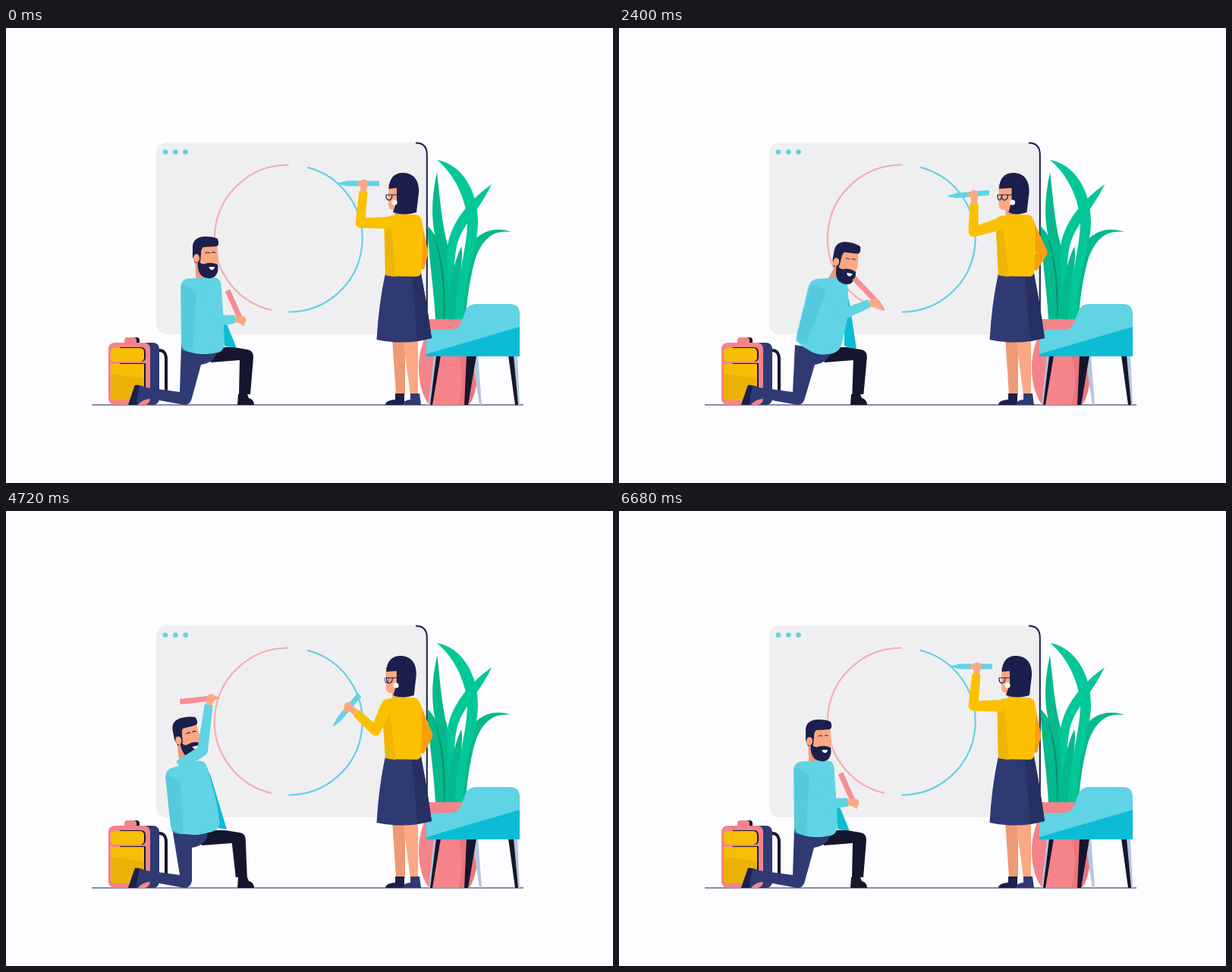
An HTML page for the animation above (6.72 s loop, 800 by 600 pixels).

```html
<!DOCTYPE html>
<html lang="en">
<head>
<meta charset="utf-8">
<title>Drawing together</title>
<style>
  html, body { margin: 0; width: 100%; height: 100%; overflow: hidden; background: #fdfcff; }
  svg { display: block; width: 800px; height: 600px; }
  .navy { fill: #2f3a73; } .ink { fill: #1b1f4b; } .black { fill: #15162e; }
  .sky { fill: #60d3e4; } .teal { fill: #0cbcd5; } .pink { fill: #f5838a; }
  .skin { fill: #fba883; } .tan { fill: #ee9a76; } .sun { fill: #fbc100; }
  .leaf { fill: #02c798; } .fern { fill: #04b98c; } .moss { fill: #07906f; } .steel { fill: #b3c6dd; }
  .line { fill: none; stroke: #1b1f4b; }
</style>
</head>
<body>
<svg viewBox="0 0 800 600">
  <rect width="800" height="600" fill="#fdfcff"/>

  <!-- board -->
  <rect x="198" y="151" width="357" height="253" rx="14" fill="#efeff2"/>
  <path class="line" stroke-width="2" d="M540 151.5Q554.8 151.5 554.8 167V392"/>
  <g class="sky"><circle cx="210" cy="163.5" r="3.3"/><circle cx="223.4" cy="163.5" r="3.3"/><circle cx="236.6" cy="163.5" r="3.3"/></g>
  <g fill="none" stroke-width="2.2">
    <path stroke="#f7adae" d="M372.5 180.5A97 97 0 0 0 350 372"/>
    <path stroke="#60d3e4" d="M397 183.6A97 97 0 0 1 372.5 374.5"/>
  </g>
  <path class="line" d="M113 497H682"/>

  <!-- plant -->
  <path id="leafLeft" class="fern"/>
  <path class="moss" d="M566 281Q581 284 587 297L593 384H577Q577 320 566 281Z"/>
  <path id="leafSmall" class="fern"/>
  <path id="leafSpike" class="fern"/>
  <path id="leafCross" class="leaf"/>
  <path class="fern" d="M600 288Q603 300 597 335L594 384H581Q582 350 588 328Q592 305 600 288Z"/>
  <path id="leafTop" class="leaf"/>
  <path class="pink" d="M557 384H606V400C614 412 622 428 622 446C622 472 616 490 610 497H558C550 488 544 470 544 448C544 428 550 410 557 400Z"/>
  <path fill="#ee747d" d="M597 433H622C622 470 616 490 610 497H596Q605 470 597 433Z"/>

  <!-- chair -->
  <path class="steel" d="M564 432H570L560 497H557ZM614 432H622L627 497H624ZM668 432H674L677 497H674Z"/>
  <path class="black" d="M567 432H573L562 497H559ZM607 432H620L609 497H604ZM662 432H669L675 497H671Z"/>
  <path class="sky" d="M554 433V410Q554 398 566 398H585Q596 398 600 388L605 374Q609 364 619 364H664Q677 364 677 377V433Z"/>
  <path class="teal" d="M554 430L677 394V433H554Z"/>

  <!-- suitcase -->
  <path class="line" stroke-width="4" style="stroke:#15162e" d="M200 425Q211 424 211 437V478Q211 489 200 489"/>
  <path class="black" d="M160 416V411Q160 408 164 408H172Q176 408 176 412V416Z"/>
  <path class="pink" d="M156 416V412Q156 408 160 408H168Q172 408 172 412V416Z"/>
  <rect class="navy" x="160" y="415" width="42" height="82" rx="8"/>
  <rect class="pink" x="135" y="415" width="55" height="82" rx="8"/>
  <path class="black" d="M150 421H178Q184 421 184 428V434Q184 440 178 440H150ZM150 442H184V485Q184 491 178 491H150Z"/>
  <rect x="138" y="422" width="44" height="18" rx="5" fill="#f6be05"/>
  <path fill="#f6be05" d="M138 443H182V485Q182 491 176 491H144Q138 491 138 485Z"/>
  <path fill="#eab207" d="M138 456L182 462V485Q182 491 176 491H144Q138 491 138 485Z"/>

  <!-- kneeling figure -->
  <path id="manBackArm" class="teal"/>
  <path id="manFrontLeg" class="black"/>
  <path class="black" d="M306 483H318L320 488Q327 490 327 497H305Z"/>
  <path id="manKneel" class="navy"/>
  <path class="ink" d="M170 471Q174 470 176 473L173 485L172 497H161Z"/>
  <path id="manNeck" fill="none" stroke="#f0997a" stroke-width="13"/>
  <path id="manTorso" class="sky"/>
  <path id="manShade" fill="#4cc6d9" opacity=".6"/>
  <g id="manHead">
    <path class="skin" d="M253 285H278L280 304Q280 316 270 318H253Z"/>
    <path class="ink" d="M246 302V288Q247 275 263 275Q274 275 279 278Q282 287 277 288L260 289Q257 291 257 298L256 308L249 310Z"/>
    <path class="ink" d="M253 305Q257 313 262 311Q270 308 279 312Q281 322 275 328Q267 333 258 327Q251 320 253 305Z"/>
    <ellipse class="skin" cx="251" cy="303.500" rx="4" ry="5.500"/>
    <path fill="#fff" d="M267.500 315H275Q274.500 319 271 319Q268 318.500 267.500 315Z"/>
    <path class="line" stroke-width="1" d="M262.500 297q3 -2 6 0M271 296.500q2.500 -2 5 0"/>
  </g>
  <path id="manArm" class="sky"/>
  <path id="manPencil" fill="#f78e92"/>
  <path id="manHand" class="skin"/>

  <!-- standing figure -->
  <path class="tan" d="M509 408H526V484H514Z"/>
  <path class="skin" d="M523 408H543V484H533Z"/>
  <path class="ink" d="M513 482H525V497H500Q500 491 513 490Z"/>
  <path class="navy" d="M533 482H545L547 497H523Q523 491 533 490Z"/>
  <path id="womanBackArm" fill="#f99f0d"/>
  <path class="navy" d="M500 323H547Q555 365 561 409Q526 419 488.500 411Q491 365 500 323Z"/>
  <path fill="#273063" d="M535 325H547Q555 365 561 409L542 413Z"/>
  <path id="womanNeck" class="tan"/>
  <path id="womanTorso" class="sun"/>
  <path id="womanShade" fill="#efb505"/>
  <g id="womanHead">
    <path class="skin" d="M504 206V234Q505 240 511 240H526V206Z"/>
    <path id="hair" class="ink"/>
    <path id="lens" class="line" stroke-width="1.200"/>
    <path id="farLens" class="line" stroke-width="1.200"/>
    <circle id="earring" cy="230" r="3.600" fill="#fff"/>
  </g>
  <path id="womanArm" class="sun"/>
  <path id="womanPencil" class="sky"/>
  <path id="womanHand" class="skin"/>
</svg>
<script>
const LOOP = 6720;
const parts = {};
document.querySelectorAll('[id]').forEach(el => parts[el.id] = el);
const draw = (id, d) => parts[id].setAttribute('d', d);

// Arm: shoulder, elbow, wrist, grip. Pencil: tip, end.
const rest = {
  head: [262, 303, 0], hip: [0], neck: [257, 334],
  torso: [230, 331, 283, 328, 287, 390, 288, 427, 258, 431, 231, 425],
  back: [284, 375, 290, 388, 304, 422, 288, 420],
  arm: [268, 345, 278, 386, 302, 384, 311, 385], pencil: [313, 393, 292, 346]
};
const lean = {
  head: [293, 308, 5], hip: [1], neck: [280, 336],
  torso: [252, 331, 301, 329, 303, 375, 291, 428, 262, 432, 232, 414],
  back: [297, 352, 303, 358, 313, 423, 297, 420],
  arm: [285, 345, 292, 379, 332, 363, 341, 363], pencil: [350, 372, 315, 330]
};
const leanLow = { ...lean, head: [297, 310, 10], pencil: [350, 372, 310, 330], arm: [285, 345, 292, 379, 330, 363, 338, 362] };
const lift = {
  head: [256, 301, 0], hip: [-6], neck: [251, 333],
  torso: [225, 333, 276, 327, 278, 380, 283, 423, 250, 430, 224, 420],
  back: [277, 340, 283, 368, 299, 419, 283, 422],
  arm: [268, 337, 282, 337, 287, 286, 290, 278], pencil: [299, 277, 249, 284]
};
const reach = {
  head: [238, 300, -11], hip: [-12], neck: [235, 334],
  torso: [209, 341, 262, 327, 277, 380, 283, 420, 252, 428, 218, 424],
  back: [262, 333, 270, 350, 291, 420, 274, 417],
  arm: [228, 336, 259, 316, 267, 258, 270, 249], pencil: [281, 248, 229, 253]
};
const reachHigh = { ...reach, arm: [228, 336, 259, 316, 268, 254, 271, 246], pencil: [281, 245, 230, 251] };

const manKeys = [[0, rest], [900, lean], [1000, lean], [2400, leanLow], [3280, lift],
  [3920, reach], [5600, reachHigh], [6560, rest], [LOOP, rest]];

const pose = (dx, turn, top, elbow, arm, pencil) => ({ head: [dx, turn], top: [top], elbow: [elbow], arm, pencil });
const up = pose(0, 0, 0, 549, [505, 257, 467, 257, 471, 215, 472, 205], [437, 205, 492, 205]);
const womanKeys = [[0, up],
  [1000, pose(0, 0, 0, 559, [505, 257, 467, 246, 467, 205, 467, 194], [432, 201, 487, 190])],
  [2400, pose(-3.5, 1, -2, 557, [503, 258, 467, 269, 468, 231, 468, 219], [433, 222, 488, 217])],
  [3280, pose(-9, 1, -7, 554, [498, 257, 481, 290, 462, 259, 455, 248], [428, 267, 473, 237])],
  [3920, pose(-7.5, 1, -5, 554, [500, 257, 483, 290, 461, 261, 453, 250], [429, 272, 472, 238])],
  [5600, pose(0, 0, -1, 556, [503, 258, 490, 290, 462, 270, 450, 264], [434, 293, 460, 246])],
  [6560, up], [LOOP, up]];

// Monotone cubic through the keys: holds stay still, passing poses keep their speed.
function sample(keys, t) {
  let i = 0;
  while (i < keys.length - 2 && t >= keys[i + 1][0]) i++;
  const span = keys[i + 1][0] - keys[i][0], u = (t - keys[i][0]) / span;
  const result = {};
  for (const name in keys[0][1]) {
    result[name] = keys[i][1][name].map((a, n) => {
      const b = keys[i + 1][1][name][n];
      const rate = k => (keys[k + 1][1][name][n] - keys[k][1][name][n]) / (keys[k + 1][0] - keys[k][0]);
      const slope = k => {
        if (k === 0 || k === keys.length - 1) return 0;
        const p = rate(k - 1), q = rate(k);
        return p * q > 0 ? 2 * p * q / (p + q) : 0;
      };
      const v = 1 - u;
      return v * v * ((1 + 2 * u) * a + u * span * slope(i)) + u * u * ((1 + 2 * v) * b - v * span * slope(i + 1));
    });
  }
  return result;
}

const pairs = list => list.reduce((out, v, i) => (i % 2 ? out[out.length - 1].push(v) : out.push([v]), out), []);
const toward = (a, b, r) => {
  const len = Math.hypot(b[0] - a[0], b[1] - a[1]) || 1, k = Math.min(r / len, 0.5);
  return [a[0] + (b[0] - a[0]) * k, a[1] + (b[1] - a[1]) * k];
};

// Polygon with rounded corners.
function soft(list, r) {
  const pts = pairs(list), n = pts.length;
  return pts.map((p, i) => {
    const from = toward(p, pts[(i + n - 1) % n], r), to = toward(p, pts[(i + 1) % n], r);
    return `${i ? 'L' : 'M'}${from}Q${p} ${to}`;
  }).join('') + 'Z';
}

const disc = ([x, y], r) => `M${x + r} ${y}A${r} ${r} 0 1 0 ${x - r} ${y}A${r} ${r} 0 1 0 ${x + r} ${y}Z`;

function bar(a, b, ra, rb) {
  const len = Math.hypot(b[0] - a[0], b[1] - a[1]) || 1;
  const nx = (a[1] - b[1]) / len, ny = (b[0] - a[0]) / len;
  const at = (p, r) => [p[0] + nx * r, p[1] + ny * r];
  return `M${at(a, ra)}L${at(b, rb)}L${at(b, -rb)}L${at(a, -ra)}Z`;
}

const limb = (a, b, c, ra, rb, rc) => bar(a, b, ra, rb) + disc(b, rb) + bar(b, c, rb, rc);

function pencil([tx, ty, ex, ey], r) {
  const neck = toward([tx, ty], [ex, ey], 12);
  return bar([tx, ty], neck, 0.4, r) + bar(neck, [ex, ey], r, r);
}

// Palm with a finger and thumb closing on the pencil.
function hand(wrist, grip, tip) {
  const finger = toward(grip, tip, 7);
  return bar(wrist, grip, 4, 5) + disc(grip, 5.5) + bar(grip, finger, 4.5, 2.5) + disc(finger, 2.5);
}

function drawPlant(t) {
  const s = (1 - Math.cos(t / LOOP * 6 * Math.PI)) / 2;
  draw('leafLeft', `M${555 - s} 260C564 270 578 288 583 320L584 384H566C564 345 558 310 ${555 - s} 260Z`);
  draw('leafSmall', `M${666 - 2 * s} ${269 - s}C644 266 628 276 618 306C611 332 607 360 606 384H594C597 345 601 318 608 295C616 273 640 259 ${666 - 2 * s} ${269 - s}Z`);
  draw('leafSpike', `M${568 + 3 * s} 190C${560 + 2 * s} 226 560 256 568 284C577 315 580 345 578 384H586C588 345 588 310 581 282C574 255 ${572 + s} 224 ${568 + 3 * s} 190Z`);
  draw('leafCross', `M${640 + 3 * s} ${206 + s}C616 223 588 252 582 286C579 320 587 345 581 384H591C593 345 588 315 594 288C600 260 622 244 ${640 + 3 * s} ${206 + s}Z`);
  draw('leafTop', `M${568 - 4 * s} ${174 + s}C${600 - 2 * s} 179 ${623 - s} 215 ${622 - s} 258C621 294 603 325 603 384H592C591 340 609 290 ${608 - s} 252C${605 - s} 222 ${590 - 2 * s} 192 ${568 - 4 * s} ${174 + s}Z`);
}

function drawMan(t) {
  const { head, hip: [h], neck, torso, back, arm, pencil: pen } = sample(manKeys, t);
  const [shoulder, elbow, wrist, grip] = pairs(arm);
  const knee = 326 + 0.85 * h, foot = 322 + 0.35 * h;
  draw('manBackArm', soft(back, 2));
  draw('manFrontLeg', `M${262 + h} 421L${300 + h} 421L${knee - 8} 424Q${knee} 425 ${knee} 434L${foot} 483H${foot - 15}L${knee - 18} 438L${270 + h} 441Z`);
  draw('manKneel', `M${231 + h} 418L${278 + h} 426Q${276 + h} 441 ${257 + h} 444L245 488Q243 497 235 497L191 489Q180 489 174 497H161L170 471Q176 470 184 474L229 480Z`);
  draw('manNeck', `M${head[0] - 6} ${head[1] + 6}L${neck}`);
  draw('manTorso', soft(torso, 12));
  const [x, y] = torso, [bx, by] = torso.slice(10);
  draw('manShade', soft([x + 1, y + 6, x + 21, y + 15, bx + 15, by + 3, bx, by], 5));
  parts.manHead.setAttribute('transform', `translate(${head[0]} ${head[1]}) rotate(${head[2]}) translate(-262 -303)`);
  draw('manArm', limb(shoulder, elbow, wrist, 7, 7, 5.5));
  draw('manPencil', pencil(pen, 3.5));
  draw('manHand', hand(wrist, grip, pen));
}

function drawWoman(t) {
  const { head: [dx, turn], top: [s], elbow: [bend], arm, pencil: pen } = sample(womanKeys, t);
  const [shoulder, elbow, wrist, grip] = pairs(arm);
  draw('womanBackArm', limb([541 + s / 2, 257], [bend, 296], [546, 318], 7, 7.5, 5));
  draw('womanNeck', `M${511 + dx} 232H${530 + dx}L${531 + s} 252H${513 + s}Z`);
  draw('womanTorso', soft([498 + s, 249, 517 + s, 246, 546 + s, 246, 550 + s / 2, 262, 547, 328, 500, 327, 499 + s / 2, 290], 7));
  draw('womanShade', `M${499 + s} 263L${508 + s} 262L514 328L500 326Z`);
  parts.womanHead.setAttribute('transform', `translate(${dx} 0)`);
  const edge = 515 + 6 * turn, lens = 501 + 7 * turn;
  draw('hair', `M504.500 212C505 198 512 191 523 191C538 191 545 202 544 217L541 243Q526 248 ${510 + 7 * turn} 243L${edge} 228V211Z`);
  draw('lens', `M${lens} 220H${edge + 1}M${lens} 220V223Q${lens + 1} 227 ${lens + 4} 227Q${lens + 8} 226 ${lens + 8} 220`);
  draw('farLens', 'M502.500 220H509M502.500 220V223Q503 227 505 227Q508 226 508 220');
  parts.farLens.setAttribute('opacity', turn);
  parts.earring.setAttribute('cx', 512 + 10 * turn);
  draw('womanArm', limb(shoulder, elbow, wrist, 8, 6.5, 5.5));
  draw('womanPencil', pencil(pen, 3.4));
  draw('womanHand', hand(wrist, grip, pen));
}

const start = performance.now();
function frame(now) {
  const t = Math.max(0, now - start) % LOOP;
  drawPlant(t);
  drawMan(t);
  drawWoman(t);
  requestAnimationFrame(frame);
}
frame(start);
</script>
</body>
</html>
```
